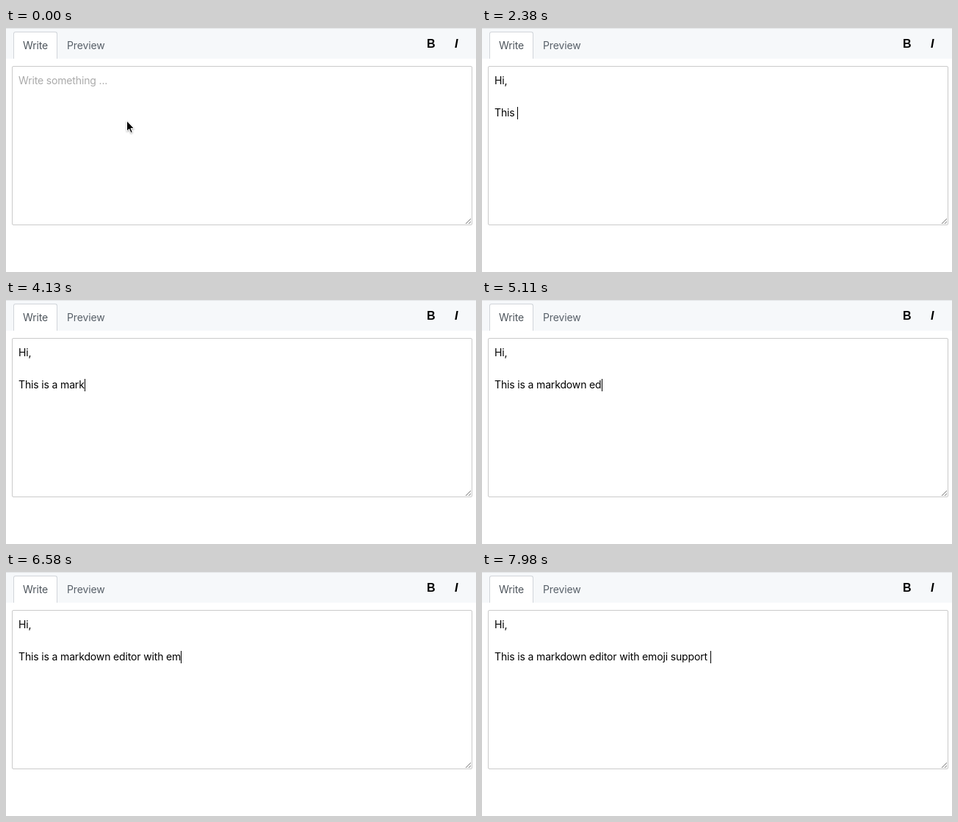
These frames come from a looping animation (640x334 px, 8 s). An HTML page:

```html
<!DOCTYPE html>
<html lang="en">
<head>
<meta charset="utf-8">
<title>Editor</title>
<style>
  html, body { margin: 0; width: 100%; height: 100%; overflow: hidden; background: #fff; }
  body { position: relative; font: 14px/22px Inter, sans-serif; letter-spacing: -0.15px; }
  body > * { position: absolute; box-sizing: border-box; }
  .bar { left: 0; top: 0; width: 640px; height: 42px; background: #f6f8fa; border-top: 1px solid #e3e5e7; }
  .tab { top: 5px; height: 37px; line-height: 37px; color: #586069; }
  .on { left: 10px; width: 60px; padding-left: 12px; line-height: 36px; color: #24292e99; color: #4f565d;
        background: #fff; border: 1px solid #d1d5da; border-bottom: 0; border-radius: 3px 3px 0 0; }
  .tool { top: 11px; font: bold 16px/22px "Liberation Sans", Arial, sans-serif; color: #000; }
  .area { left: 8px; top: 52px; width: 627px; height: 218px; padding: 8px;
          border: 1px solid #cacaca; border-radius: 2px; white-space: pre; color: #000; }
  .hint { color: #aaa; }
  .caret { display: inline-block; width: 1px; height: 17px; margin-right: -1px; background: #000; vertical-align: -4px; }
  svg { left: 0; top: 0; }
</style>
</head>
<body>
<div class="bar"></div>
<div class="tab on">Write</div>
<div class="tab" style="left:83px">Preview</div>
<div class="tool" style="left:573px">B</div>
<div class="tool" style="left:611px;font-style:italic">I</div>
<div class="area"><span id="text"></span><i class="caret" id="caret"></i><span class="hint" id="hint">Write something ...</span></div>
<svg width="640" height="334">
  <path d="M626 268l7-7M630 268l3-3" stroke="#777" fill="none"/>
  <path id="mouse" d="M164.500 127v14.200l3.200-3 2.300 5.300 2.300-1-2.300-5.100h4.400z" stroke="#fff" style="filter:drop-shadow(0 1px 1px #0005)"/>
</svg>
<script>
const LOOP = 8000;
const keys = [
  [630, "H"], [770, "i"], [1050, ","], [1260, "\n"], [1400, "\n"], [2030, "T"],
  [2100, "h"], [2170, "i"], [2310, "s"], [2380, " "], [2450, "i"], [2590, "s"], [2660, " "], [2800, "a"], [2870, " "],
  [3430, "m"], [3640, "a"], [3850, "r"], [4130, "k"],
  [4480, "d"], [4620, "o"], [4690, "w"], [4830, "n"], [4900, " "], [5040, "e"], [5110, "d"], [5180, "i"], [5320, "t"], [5390, "o"],
  [5530, "r"], [5670, " "], [5810, "w"], [5880, "i"], [6020, "t"], [6160, "h"], [6300, " "], [6440, "e"],
  [6580, "m"], [6720, "o"], [6860, "j"], [6930, "i"], [7070, " "], [7210, "s"], [7350, "u"], [7490, "pp"],
  [7630, "o"], [7770, "rt"], [7980, " "]
];
const [text, caret, hint, mouse] = ["text", "caret", "hint", "mouse"].map(id => document.getElementById(id));
const show = (el, on) => { el.style.visibility = on ? "visible" : "hidden"; };

function draw(now) {
  const t = now % LOOP;
  const typed = keys.filter(k => k[0] <= t).map(k => k[1]).join("");
  if (text.textContent !== typed) text.textContent = typed;
  show(caret, t >= 280 && !(t >= 3360 && t < 3430));
  show(hint, !typed);
  hint.style.display = typed ? "none" : "";
  show(mouse, !typed);
  requestAnimationFrame(draw);
}
draw(performance.now());
</script>
</body>
</html>
```
